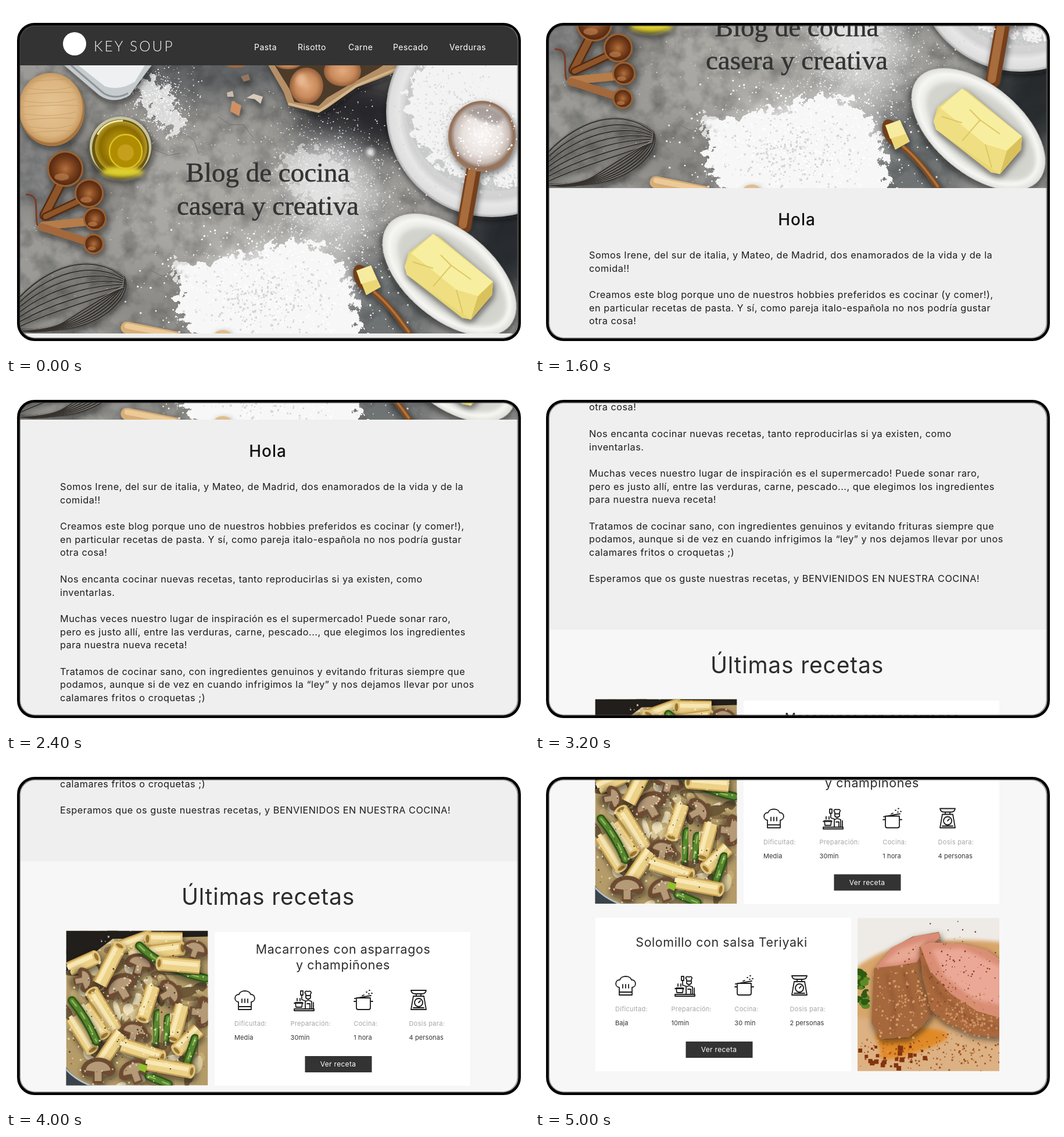
These frames come from a looping animation (900 px wide and 600 px high, 6000 ms). An HTML page:

```html
<!DOCTYPE html>
<html lang="es">
<head>
<meta charset="utf-8">
<title>Blog de cocina</title>
<style>
html, body { margin: 0; width: 100%; height: 100%; overflow: hidden; background: #fff; }
svg { display: block; }
text { font-family: Inter, "Open Sans", sans-serif; fill: #1c1c1c; }
.nav { font-size: 14px; letter-spacing: .45px; fill: #fff; }
.brand { font: 300 24.5px Lato, sans-serif; letter-spacing: 3px; fill: #f4f4f4; }
.hero { font: 47px "Liberation Serif", serif; fill: #333; stroke: #333; stroke-width: .5; }
.hola { font-size: 28px; font-weight: 500; letter-spacing: 1px; fill: #111; }
.body { font-size: 16.3px; letter-spacing: .49px; }
.latest { font-size: 39px; letter-spacing: .8px; fill: #2c2c2c; }
.dish { font-size: 21.4px; letter-spacing: .62px; fill: #2c2c2c; }
.label { font-size: 11px; letter-spacing: .3px; fill: #a6a6a6; }
.value { font-size: 11px; letter-spacing: .1px; fill: #333; }
.button { font-size: 12px; letter-spacing: .3px; fill: #fff; }
.icon { fill: none; stroke: #1d1d1d; stroke-width: 1.8; stroke-linecap: round; stroke-linejoin: round; }
</style>
</head>
<body>
<svg id="stage" width="900" height="600" viewBox="0 0 900 600" xmlns="http://www.w3.org/2000/svg"></svg>
<script>
const LOOP = 6000, HOLD = 1000, STEP = 200, STEP_PX = 62.5, MAX_STEPS = 21;

let seed = 11;
const rnd = () => (seed = (seed * 16807) % 2147483647) / 2147483647;
const span = (a, b) => a + (b - a) * rnd();
const bell = () => rnd() + rnd() + rnd() + rnd() - 2;
const times = (n, fn) => Array.from({ length: n }, (_, i) => fn(i)).join('');

const rect = (x, y, w, h, fill, more = '') =>
  `<rect x="${x}" y="${y}" width="${w}" height="${h}" fill="${fill}" ${more}/>`;
const oval = (x, y, rx, ry, fill, more = '') =>
  `<ellipse cx="${x}" cy="${y}" rx="${rx}" ry="${ry}" fill="${fill}" ${more}/>`;
const shape = (d, fill, more = '') => `<path d="${d}" fill="${fill}" ${more}/>`;
const line = (d, color, w, more = '') =>
  `<path d="${d}" fill="none" stroke="${color}" stroke-width="${w}" ${more}/>`;
const text = (cls, x, y, s, mid) =>
  `<text class="${cls}" x="${x}" y="${y}"${mid ? ' text-anchor="middle"' : ''}>${s}</text>`;
const group = (more, ...parts) => `<g ${more}>${parts.join('')}</g>`;
const turn = (deg, x, y) => `transform="rotate(${deg} ${x} ${y})"`;
const SHADOW = 'filter="url(#shadow)"', SOFT = 'filter="url(#soft)"',
      BLUR = 'filter="url(#blur)"', ROUGH = 'filter="url(#rough)"', ROUND = 'stroke-linecap="round"';

// Scattered grains around a centre, joined in one path
const grains = (n, x, y, sx, sy, color, size = 1.4, more = '') => shape(times(n, () => {
  const s = (size * span(.5, 1.5)).toFixed(1);
  return `M${(x + bell() * sx).toFixed(1)} ${(y + bell() * sy).toFixed(1)}h${s}v${s}h-${s}z`;
}), color, more);

const radial = (id, ...stops) => `<radialGradient id="${id}">${stops.map(([at, c]) =>
  `<stop offset="${at}" stop-color="${c}"/>`).join('')}</radialGradient>`;
const blurFilter = (id, s) =>
  `<filter id="${id}" x="-50%" y="-50%" width="200%" height="200%"><feGaussianBlur stdDeviation="${s}"/></filter>`;

const defs = `<defs>
  <clipPath id="screen"><rect x="23" y="33" width="858" height="539" rx="27"/></clipPath>
  <clipPath id="heroBox"><rect x="23" y="102" width="858" height="461"/></clipPath>
  <clipPath id="pastaBox"><rect width="244" height="266"/></clipPath>
  <clipPath id="steakBox"><rect width="244" height="263"/></clipPath>
  ${blurFilter('soft', 3)}${blurFilter('blur', 26)}
  <filter id="shadow" x="-30%" y="-30%" width="160%" height="160%">
    <feDropShadow dx="2" dy="5" stdDeviation="6" flood-color="#111" flood-opacity=".65"/></filter>
  <filter id="rough" x="-20%" y="-20%" width="140%" height="140%" color-interpolation-filters="sRGB">
    <feTurbulence type="fractalNoise" baseFrequency=".07" numOctaves="4" seed="4"/>
    <feDisplacementMap in="SourceGraphic" scale="60" xChannelSelector="R" yChannelSelector="G"/>
    <feGaussianBlur stdDeviation=".7"/></filter>
  <filter id="stone" x="0" y="0" width="100%" height="100%" color-interpolation-filters="sRGB">
    <feTurbulence type="fractalNoise" baseFrequency=".035" numOctaves="5" seed="8"/>
    <feColorMatrix values="0 0 0 0 .12  0 0 0 0 .13  0 0 0 0 .14  1.6 0 0 0 -.65"/></filter>
  ${radial('board', [0, '#e6c594'], [.8, '#dcb581'], [1, '#c79a60'])}
  ${radial('oil', [0, '#c9a51a'], [.5, '#a88708'], [.8, '#8a6c04'], [1, '#b79a25'])}
  ${radial('cup', [0, '#b2703c'], [.55, '#7d431f'], [1, '#542810'])}
  ${radial('egg', [0, '#e2ac80'], [.65, '#c98a5c'], [1, '#96603a'])}
  ${radial('bowl', [0, '#f2f2f1'], [.82, '#d0d1d0'], [.88, '#e6e7e6'], [.97, '#dcdddc'], [1, '#a9abab'])}
  ${radial('dish', [0, '#d6d6d2'], [.75, '#e3e3df'], [.9, '#f6f6f3'], [1, '#dcdcd8'])}
  ${radial('ladle', [0, '#fbf8f6'], [.6, '#e9e2df'], [.85, '#c8bbb5'], [1, '#8a6a57'])}
</defs>`;

function whisk() {
  return group('stroke-linecap="round"',
    times(7, k => {
      const d = `M10 ${515 + k * 7}C70 ${442 + k * 14} 150 ${422 + k * 14} 203 ${466 + k * 3}` +
        `C${218 - k * 6} ${495 - k} ${172 - k * 8} ${546 - k * 3} 100 ${555 - k * 2}S30 558 10 ${552 + k}`;
      return line(d, '#35322f', 3.2) + line(d, '#a19d98', 1, 'transform="translate(-.6 -.8)"');
    }));
}

function spoons() {
  const handle = (d, w) => line(d, '#57290f', w, ROUND) + line(d, '#8f552b', w - 5, ROUND);
  const cup = (x, y, r) => oval(x, y, r, r, '#9c602f') + oval(x, y, r - 3, r - 3, 'url(#cup)') +
    oval(x - r * .2, y + r * .45, r * .4, r * .2, '#c38654', 'opacity=".6"');
  return group(SHADOW,
    line('M34 324C60 325 48 345 54 378', '#7b3b23', 3),
    handle('M95 304L66 360', 17), handle('M128 334L68 362', 14),
    line('M135 371L64 378', '#b67c48', 14, ROUND), line('M136 404L62 380', '#a3683a', 13, ROUND),
    cup(102, 280, 31), cup(143, 322, 25), cup(153, 366, 20), cup(151, 409, 17.5));
}

function eggs() {
  return group(SHADOW,
    shape('M448 96L478 148 486 171 538 184 552 176 603 140 640 126 674 112 674 96Z', '#b59066'),
    shape('M460 98L488 143 496 165 538 172 552 158 600 130 640 108 655 98Z', '#4e3a2b'),
    oval(485, 94, 26, 15, 'url(#egg)'), oval(579, 112, 32, 26, 'url(#egg)'),
    oval(517, 137, 29, 31, 'url(#egg)'), oval(508, 127, 9, 11, '#efc5a2', `opacity=".7" ${SOFT}`),
    line('M486 168L538 181 552 172 603 137 672 108', '#d5b78e', 4));
}

function butter() {
  return group('',
    oval(763, 462, 136, 76, 'url(#dish)', `${turn(40, 763, 462)} ${SHADOW}`),
    oval(768, 466, 112, 56, '#cfcfc9', `${turn(40, 768, 466)} ${SOFT} opacity=".75"`),
    group(SHADOW,
      shape('M735 392L745 397 838 474 836 497 800 539 785 536 690 462 686 448 693 424Z', '#ead773'),
      shape('M735 392L838 474 812 499 775 488 697 425Z', '#f7ee9f'),
      shape('M697 425L775 488 812 499 800 539 690 462 686 448Z', '#efdf82'),
      shape('M812 499L838 474 836 497 800 539Z', '#d9c25b')),
    line('M748 428L766 446 735 482M766 446L800 470M700 440L735 451M775 488L786 528', '#dcc763', 2));
}

function hero() {
  const tint = (x, y, rx, ry, c, o) => oval(x, y, rx, ry, c, `opacity="${o}" ${BLUR}`);
  return group('clip-path="url(#heroBox)"',
    rect(23, 102, 858, 461, '#9b9a96'),
    tint(340, 110, 170, 50, '#55585b', .85), tint(610, 190, 110, 75, '#212427', .95),
    tint(860, 400, 80, 100, '#23282b', .95), tint(640, 520, 110, 90, '#6b6e70', .9),
    tint(330, 330, 150, 110, '#b0aea9', .7), tint(30, 270, 60, 90, '#77787a', .7),
    tint(150, 290, 60, 70, '#55534f', .5), tint(250, 520, 80, 50, '#82817d', .6),
    rect(23, 102, 858, 461, '#000', 'filter="url(#stone)" opacity=".4"'),
    line('M365 190l20 14 24 0 16 22M300 215l24 16 8 24M250 455l20 10 12-8 16 4M250 245l30 12 20-4', '#5e5d5a', 1, 'opacity=".6"'),

    tint(560, 320, 75, 95, '#e6e7e7', .75), tint(470, 480, 130, 70, '#fff', .8),
    shape('M228 125Q280 125 290 165L308 210 280 215 232 170Z', '#f2f2f2', `${ROUGH} opacity=".8"`),
    shape('M300 450L395 428 425 438 460 405 520 408 570 432 600 500 615 575 320 575 295 520Z', '#f7f7f7', ROUGH),
    shape('M290 435L316 440 302 470 288 468Z', '#f0f0f0', `${ROUGH} opacity=".8"`),
    shape('M470 250L540 245 600 290 580 345 500 330Z', '#ededed', `${ROUGH} opacity=".55"`),
    grains(500, 265, 165, 48, 55, '#fff'), grains(1300, 560, 310, 110, 125, '#f4f4f4', 1.3),
    grains(900, 460, 490, 170, 95, '#fff', 2), grains(350, 450, 500, 100, 55, '#d3d4d4', 2.4),
    grains(260, 420, 300, 380, 180, '#e8e8e8', 1.1), oval(627, 251, 7, 7, '#eee', SOFT),

    group(SHADOW, shape('M98 100L160 153Q185 170 212 154L252 100Z', '#c6cbcd'),
      shape('M122 100L170 138Q195 147 222 130L240 100Z', '#eef0f1'),
      line('M112 102L168 150Q188 162 210 150', '#8d9497', 3)),
    group(SHADOW, oval(79, 179, 56, 62, '#a97640'), oval(77, 175, 55, 60, 'url(#board)'),
      line(times(9, i => `M${26 + Math.abs(i - 4) * 4} ${130 + i * 11}q48 ${i % 2 ? 8 : -5} ${98 - Math.abs(i - 4) * 7} -3`), '#c79b62', 1.2, 'opacity=".7"')),
    group(SHADOW, oval(197, 244, 55, 54, '#5f5a3c'), oval(197, 242, 53, 52, '#c9c6a6'),
      oval(197, 245, 49, 50, '#6a5610'), oval(198, 243, 45, 45, 'url(#oil)'),
      oval(200, 285, 35, 9, '#ddcf2f', SOFT),
      oval(206, 250, 28, 29, '#b08d06', 'stroke="#dec227" stroke-width="2.5"'),
      oval(206, 252, 14, 14, '#c6a01a'), line('M158 220Q170 198 200 197', '#f1e9a8', 3, ROUND)),
    spoons(), group(SHADOW, whisk()),
    group(SHADOW, line('M208 553L292 570', '#d7ad77', 21, ROUND), line('M208 550L290 566', '#ecca98', 9, ROUND),
      oval(373, 565, 14, 8, '#e0bd8c')),
    oval(396, 99, 19, 7, '#a4683f'), eggs(),
    group(SHADOW, shape('M389 163L405 171 401 189 386 181Z', '#cf9163'),
      shape('M414 158L426 151 442 156 438 168 428 160Z', '#d9cbbc'),
      shape('M404 121L417 117 420 127 409 130Z', '#94765f'), shape('M380 149L390 146 392 156 381 156Z', '#c8bcae')),

    group(SHADOW, oval(836, 182, 182, 181, 'url(#bowl)')),
    oval(840, 172, 152, 146, '#c9caca'), oval(844, 166, 150, 141, '#f3f3f3', ROUGH),
    grains(500, 760, 200, 70, 90, '#d9d9d9', 2), grains(160, 830, 300, 60, 20, '#d5d5d5', 2),
    group(SHADOW, line('M806 275L788 378', '#74411f', 25, ROUND), line('M803 278L786 376', '#a86c3d', 14, ROUND),
      oval(819, 224, 58, 61, '#9b7458'), oval(819, 222, 55, 57, 'url(#ladle)'),
      shape('M790 183Q820 160 858 190L845 205 815 196Z', '#8b8380', `opacity=".65" ${SOFT}`)),
    grains(150, 822, 225, 45, 45, '#fff', 2),
    butter(),
    group(SHADOW, line('M635 494Q662 515 696 566', '#7c4a21', 10, ROUND), line('M634 492Q660 513 693 560', '#b0733b', 4, ROUND),
      oval(615, 468, 15, 25, '#70401d', turn(-28, 615, 468)),
      shape('M603 455L628 446 645 483 620 497Z', '#ecd777'), shape('M603 455L628 446 638 470 611 478Z', '#f7eb9f')),
    text('hero', 450.5, 302, 'Blog de cocina', true), text('hero', 450.5, 359, 'casera y creativa', true));
}

function pasta() {
  const penne = (x1, y1, x2, y2) => {
    const d = `M${x1} ${y1}L${x2} ${y2}`, deg = Math.atan2(y2 - y1, x2 - x1) * 180 / Math.PI;
    return group(SHADOW, line(d, '#c79f4e', 25), line(d, '#ecd189', 20),
      line(d, '#f8e8b4', 7, 'transform="translate(-3 -3)"'),
      oval(x2, y2, 6, 12, '#e2c478', turn(deg, x2, y2)), oval(x2, y2, 3, 7, '#9c7433', turn(deg, x2, y2)));
  };
  const spear = d => group(SHADOW, line(d, '#2f5717', 15, ROUND), line(d, '#56872d', 9, ROUND),
    line(d, '#93b95b', 2.5, ROUND + ' stroke-dasharray="12 14"'));
  const mushroom = (x, y, r, deg) => group(`${turn(deg, x, y)} ${SHADOW}`,
    shape(`M${x - r} ${y}a${r} ${r * .8} 0 0 1 ${2 * r} 0q-${r * .3} ${r * .5}-${r * .7} ${r * .1}l0 ${r * .6}h-${r * .6}l0-${r * .6}q-${r * .4} ${r * .4}-${r * .7}-${r * .1}z`, '#6d4c30'),
    shape(`M${x - r * .7} ${y - 2}a${r * .7} ${r * .5} 0 0 1 ${r * 1.4} 0l-${r * .5} 2v${r * .55}h-${r * .4}v-${r * .55}z`, '#b59a78'));
  const tones = ['#d8c797', '#8c7149', '#eee0bb', '#6d5938', '#c2aa72'];
  return group('transform="translate(103.5 1293.5)" clip-path="url(#pastaBox)"',
    rect(0, 0, 244, 266, '#b49b68'),
    times(130, i => oval(span(0, 244), span(0, 266), span(6, 19), span(4, 10), tones[i % 5], turn(span(0, 180), 120, 130))),
    shape('M0 0H244V10L80 14 30 52 0 70Z', '#211e1b'),
    penne(90, 30, 145, 10), penne(200, 15, 140, 14), penne(110, 42, 200, 30), penne(5, 66, 52, 45),
    mushroom(222, 34, 22, 20), mushroom(126, 60, 26, 15), mushroom(28, 85, 22, 80),
    spear('M126 26Q165 65 240 82'), penne(230, 62, 160, 56),
    mushroom(95, 100, 32, -30), mushroom(176, 108, 25, 60), mushroom(232, 140, 28, 95),
    penne(58, 92, 92, 26), penne(10, 150, 45, 205), penne(86, 172, 44, 104), penne(30, 130, 66, 180),
    spear('M10 120Q35 150 52 190'), penne(150, 95, 131, 152), penne(200, 128, 184, 186),
    spear('M158 142L152 190'), spear('M176 150L170 186'), mushroom(116, 176, 25, 10),
    penne(94, 176, 60, 226), penne(96, 196, 165, 218), penne(228, 170, 190, 206), spear('M222 185L206 232'),
    mushroom(55, 242, 30, 0), mushroom(118, 244, 28, -20), penne(140, 228, 216, 242),
    spear('M142 250L176 264'), shape('M126 228l14 4 -4 12 -12-6z', '#8fc12c'),
    shape('M-2 232Q14 256 50 268L-2 268Z', '#39434c'), line('M-2 236Q14 256 46 268', '#b9c2c8', 3),
    grains(260, 120, 140, 130, 130, '#fbf1d0', 2.2, 'opacity=".7"'), grains(120, 120, 150, 130, 120, '#4d3b20', 1.8));
}

function steak() {
  return group('transform="translate(555 1584)" clip-path="url(#steakBox)"',
    rect(0, 0, 244, 263, '#eeebe6'),
    shape('M-10 90Q50 45 120 40T250 42V270H-10Z', '#d9a56b', SOFT), shape('M-5 170Q120 190 250 195V270H-5Z', '#dcb183', SOFT),
    shape('M30 200Q70 180 130 190T110 228 40 232Z', '#e08a28', SOFT),
    times(22, () => oval(span(0, 16), span(92, 158), span(4, 9), span(3, 6), rnd() < .5 ? '#2f5a12' : '#5c8a26')),
    group(SHADOW,
      shape('M28 88L58 52 95 32 140 24 143 34 112 66 106 95 128 165 112 186 88 205 40 208 24 180Z', '#a5673d'),
      shape('M30 86L60 50 100 31 140 25 142 34 113 58 102 76 66 82Z', '#d98d77'),
      shape('M44 78L72 54 118 38 104 68 70 78Z', '#e8a894', SOFT)),
    group(SHADOW,
      shape('M106 50L122 42 180 44 220 54 246 72V206L196 200 150 178 126 158 112 100Z', '#a9683d'),
      shape('M108 48L124 42 180 44 220 54 246 72V172L205 160 160 130 124 90Z', '#d98e74'),
      shape('M128 54L180 52 246 84V150L200 140 150 100Z', '#eba897', SOFT)),
    line('M115 80L140 130 190 172 244 190M50 95L64 150 60 195M80 90L96 160', '#7b4525', 5, `opacity=".45" ${SOFT}`),
    grains(130, 75, 140, 45, 60, '#d69b6b', 2.6), grains(160, 190, 165, 60, 38, '#cf9362', 2.6),
    grains(150, 160, 110, 85, 70, '#8b3d20', 1.8), grains(170, 140, 232, 140, 28, '#a5531f', 2.2),
    grains(25, 60, 238, 50, 18, '#83330e', 6));
}

const icons = [
  'M-11 16V3C-19 2-19-10-10-10C-8-18 8-18 10-10C19-10 19 2 11 3V16ZM-11 11H11M-5 4V-2M0 4V-2M5 4V-2',
  'M-17 15H17V18H-17ZM-15 4H-3L-4 12H-14ZM-17 5H-2M-12 1V-3M-7 1V-3M-6-16H-2V-9H-6ZM-4-9V-1L2 1M3-8V-11C-1-13 3-17 7-15C11-17 14-13 11-11V-8ZM3-8V-4Q7 0 11-4V-8M2 14V2L7 0L13 2V14M5 6H10V14M16 4V14',
  'M-12-4H12V13Q12 16 9 16H-9Q-12 16-12 13ZM-16 2H-12M12 2H16M-15-3L13-8M-2-8L1-9M5-14H6M10-17H11M14-12H15M9-11H10',
  'M-13-17H13Q12-11 6-11H-6Q-12-11-13-17ZM-4-11V-7M4-11V-7M-9-7H9L13 16H-13ZM0-3A7 7 0 1 0 .1-3M0 4L3 1M-9 13H9'
];

function card(x, y, title, values) {
  const labels = ['Dificultad:', 'Preparación:', 'Cocina:', 'Dosis para:'];
  const iconX = [52, 154, 256, 351], textX = [34, 130.5, 239.3, 334.5];
  return group(`transform="translate(${x} ${y})"`,
    rect(0, 0, 440, 264, '#fff'),
    title.map((s, i) => text('dish', title.length > 1 ? 221 : 217, (title.length > 1 ? 37 : 50) + i * 26.5, s, true)).join(''),
    icons.map((d, i) => `<path class="icon" d="${d}" transform="translate(${iconX[i]} 117)"/>`).join(''),
    labels.map((s, i) => text('label', textX[i], 161, s) + text('value', textX[i], 185, values[i])).join(''),
    rect(155.5, 213, 115, 28, '#333'), text('button', 212.5, 231, 'Ver receta', true));
}

const header = rect(20, 0, 864, 102, '#333') + oval(118, 65, 20, 20, '#fff') +
  text('brand', 151, 78, 'KEY SOUP') +
  [['Pasta', 427], ['Risotto', 502], ['Carne', 589], ['Pescado', 666], ['Verduras', 763]]
    .map(([s, x]) => text('nav', x, 75.5, s)).join('');

const intro = [
  'Somos Irene, del sur de italia, y Mateo, de Madrid, dos enamorados de la vida y de la', 'comida!!', '',
  'Creamos este blog porque uno de nuestros hobbies preferidos es cocinar (y comer!),',
  'en particular recetas de pasta. Y sí, como pareja italo-española no nos podría gustar', 'otra cosa!', '',
  'Nos encanta cocinar nuevas recetas, tanto reproducirlas si ya existen, como', 'inventarlas.', '',
  'Muchas veces nuestro lugar de inspiración es el supermercado! Puede sonar raro,',
  'pero es justo allí, entre las verduras, carne, pescado..., que elegimos los ingredientes',
  'para nuestra nueva receta!', '',
  'Tratamos de cocinar sano, con ingredientes genuinos y evitando frituras siempre que',
  'podamos, aunque si de vez en cuando infrigimos la “ley” y nos dejamos llevar por unos',
  'calamares fritos o croquetas ;)', '',
  'Esperamos que os guste nuestras recetas, y BENVIENIDOS EN NUESTRA COCINA!'
].map((s, i) => s && text('body', 93, 684 + i * 22.69, s)).join('');

const page = group('id="page"',
  rect(20, 563, 864, 611, '#efefef'), rect(20, 1174, 864, 760, '#f7f7f7'),
  header, hero(),
  text('hola', 450.5, 626.5, 'Hola', true), intro,
  text('latest', 451, 1249, 'Últimas recetas', true),
  pasta(), card(359, 1296, ['Macarrones con asparragos', 'y champiñones'], ['Media', '30min', '1 hora', '4 personas']),
  card(104, 1583.5, ['Solomillo con salsa Teriyaki'], ['Baja', '10min', '30 min', '2 personas']), steak());

document.getElementById('stage').innerHTML = defs + rect(0, 0, 900, 600, '#fff') +
  group('clip-path="url(#screen)"', page) +
  rect(24, 34, 856.5, 537, 'none', 'rx="26" stroke="#555" stroke-opacity=".55" stroke-width="2"') +
  rect(21.3, 31.3, 862.4, 542.4, 'none', 'rx="28" stroke="#000" stroke-width="4.6"');

const pageNode = document.getElementById('page');
let shown = -1;
function draw() {
  const t = performance.now() % LOOP;
  const steps = t < HOLD ? 0 : Math.min(MAX_STEPS, Math.floor((t - HOLD) / STEP) + 1);
  if (steps !== shown) pageNode.setAttribute('transform', `translate(0 ${-STEP_PX * steps})`);
  shown = steps;
  requestAnimationFrame(draw);
}
draw();
</script>
</body>
</html>
```
